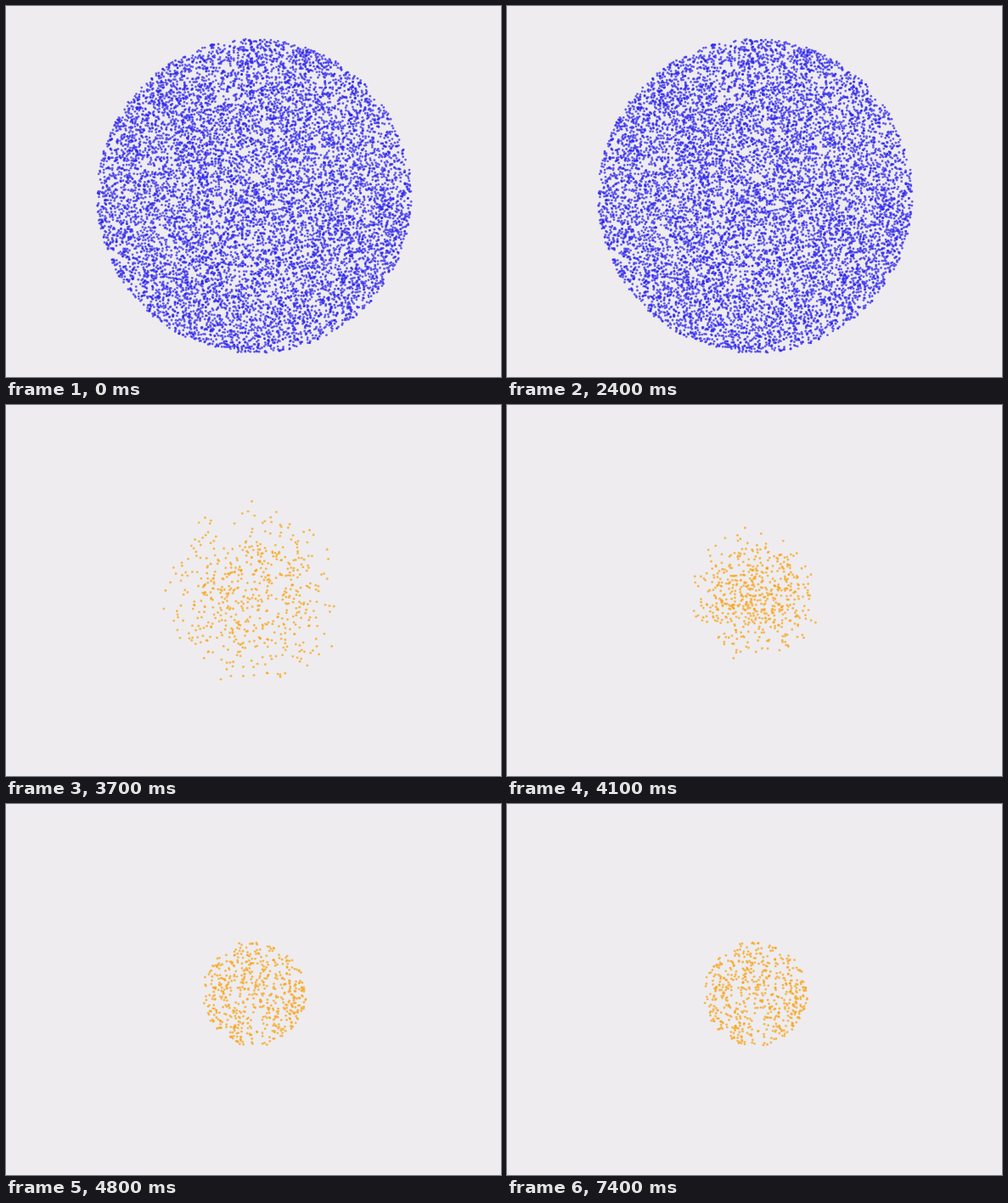
Write an HTML page with a canvas that moves like this. It is 583x437 px and loops after 8000 ms.

```html
<!DOCTYPE html>
<html lang="en">
<head>
<meta charset="utf-8">
<title>Sampled points</title>
<style>
  html, body { margin: 0; width: 100%; height: 100%; overflow: hidden; background: #eeecee; }
  canvas { display: block; }
</style>
</head>
<body>
<canvas id="stage" width="583" height="437"></canvas>
<script>
const W = 583, H = 437;
const LOOP = 8000, STEP = 100, START = 3200, MOVE = 2000;
const CX = 292.4, CY = 223.8, R_BIG = 185.2, R_SMALL = 61.5;
const TOTAL = 10000, PICKED = 560, DOT = 1.4;
const BG = '#eeecee';
const BLUE = 'rgba(46, 38, 238, 0.72)';
const ORANGE = 'rgba(248, 166, 32, 0.76)';

const ctx = document.getElementById('stage').getContext('2d');

function seeded(seed) {
  return () => {
    seed = (seed + 0x6D2B79F5) | 0;
    let t = Math.imul(seed ^ (seed >>> 15), 1 | seed);
    t = (t + Math.imul(t ^ (t >>> 7), 61 | t)) ^ t;
    return ((t ^ (t >>> 14)) >>> 0) / 4294967296;
  };
}

const rand = seeded(41);

// Uniform point in a disc
function inDisc(radius) {
  const r = radius * Math.sqrt(rand());
  const a = rand() * Math.PI * 2;
  return [CX + r * Math.cos(a), CY + r * Math.sin(a)];
}

const cloud = Array.from({ length: TOTAL }, () => inDisc(R_BIG));
const targets = Array.from({ length: PICKED }, () => inDisc(R_SMALL));

function dot(c, x, y) {
  c.beginPath();
  c.arc(x, y, DOT, 0, Math.PI * 2);
  c.fill();
}

// The full cloud never moves, so paint it once
const full = document.createElement('canvas');
full.width = W;
full.height = H;
const fullCtx = full.getContext('2d');
fullCtx.fillStyle = BLUE;
for (const [x, y] of cloud) dot(fullCtx, x, y);

const easeOut = u => 1 - (1 - u) ** 3;

function draw(t) {
  ctx.fillStyle = BG;
  ctx.fillRect(0, 0, W, H);
  if (t < START) {
    ctx.drawImage(full, 0, 0);
    return;
  }
  const p = easeOut(Math.min(1, (t - START) / MOVE));
  ctx.fillStyle = ORANGE;
  targets.forEach(([tx, ty], i) => {
    const [x, y] = cloud[i];
    dot(ctx, x + (tx - x) * p, y + (ty - y) * p);
  });
}

const origin = performance.now();
let shown = -1;

function tick() {
  const t = (performance.now() - origin) % LOOP;
  const step = Math.floor(t / STEP);
  if (step !== shown) {
    shown = step;
    draw(step * STEP);
  }
  requestAnimationFrame(tick);
}

tick();
</script>
</body>
</html>
```
